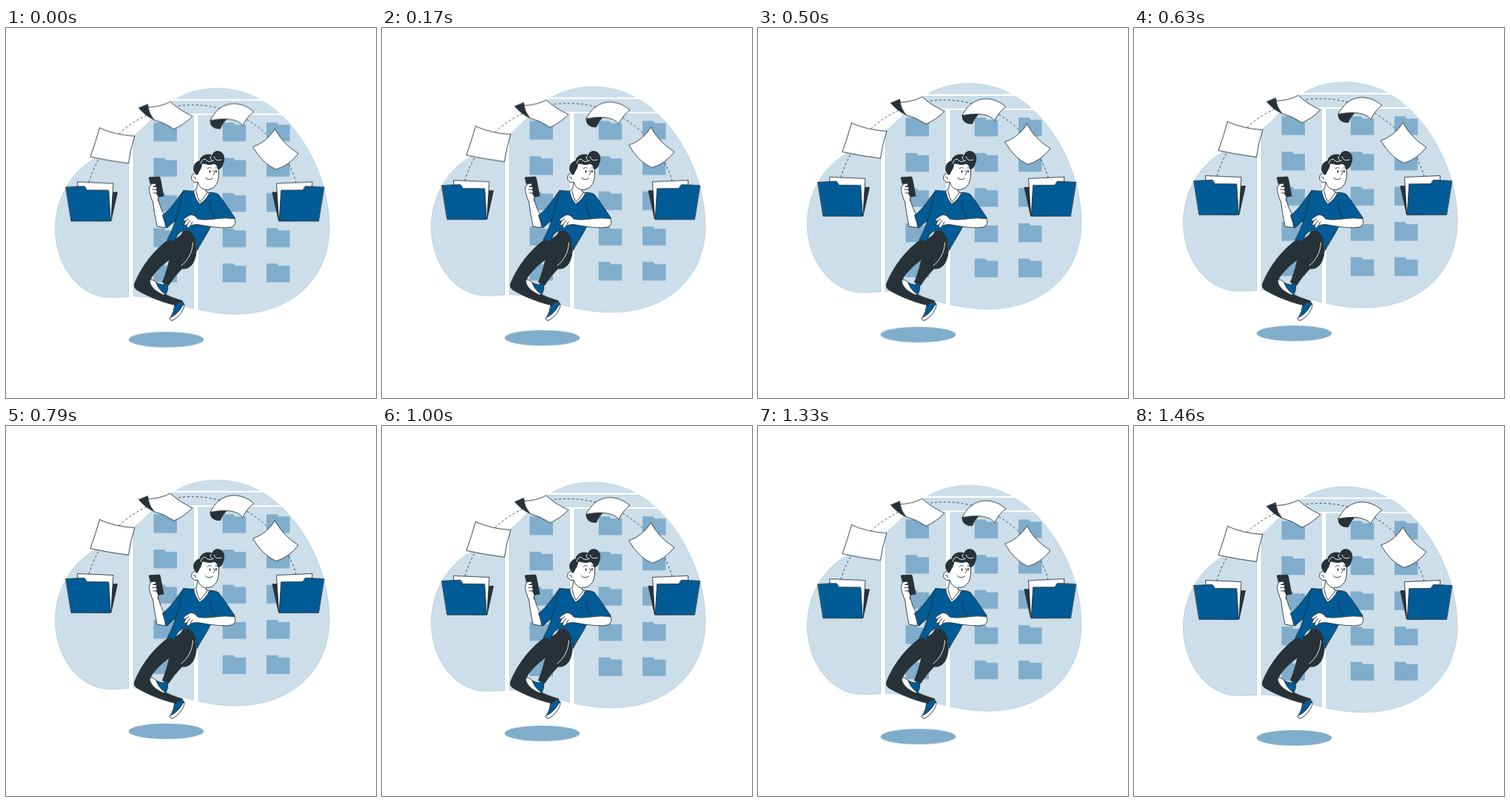
Write an HTML page without scripts that moves like this. It is 500x500 px and loops after 1.5 s.

```html
<!DOCTYPE html>
<html lang="en">
<head>
<meta charset="utf-8">
<title>File transfer</title>
<style>
  html, body { margin: 0; width: 100%; height: 100%; overflow: hidden; background: #fff; }
  svg { display: block; width: 100%; height: 100%; }
  .float { animation: float 1.5s linear -.035s infinite; }
  @keyframes float { 50% { transform: translateY(-10px); } }
  .line { stroke: #263238; stroke-width: .9; stroke-linejoin: round; stroke-linecap: round; }
  .none { fill: none; }
  .white { fill: #fff; }
  .blue { fill: #005b96; }
  .dark { fill: #263238; }
  .mid { fill: #80adcb; }
  .edge { stroke: #80adcb; }
  .gap { stroke: #fff; }
</style>
</head>
<body>
<svg viewBox="0 0 500 500">
  <defs>
    <path id="blob" d="M285 82C308 82 328 88 345 98C392 124 437 195 437 270C437 340 385 387 310 387C255 387 215 363 172 363C160 364 150 364.500 140 364.500C98 364 66.500 320 66.500 272C66.500 238 82 203 110 183C130 169 150 161 171 147C190 134 203 113 228 97C245 87 265 82 285 82Z"/>
    <clipPath id="inside"><use href="#blob"/></clipPath>
    <path id="icon" d="M0 0H14.500L16.500 3H31.500V25.300H0Z"/>
    <g id="column" class="mid">
      <use href="#icon"/>
      <use href="#icon" y="47.600"/>
      <use href="#icon" y="95.200"/>
      <use href="#icon" y="142.800"/>
      <use href="#icon" y="190.400"/>
    </g>
    <path id="uprights" d="M169 130V380M256.700 118V400"/>
    <path id="shelves" d="M205 97.800H360M180 117H390"/>
    <g id="folder" class="line">
      <path class="dark" d="M143 222.500H150.500L142 261H120Z"/>
      <path class="white" d="M97 208.500L145 210.500L142 259H100Z"/>
      <path class="blue" d="M81 215.500L106 214.300L109.500 219.500L138.800 219.800L141.300 261.300H88.300Z"/>
    </g>
  </defs>

  <g class="float">
    <use href="#blob" fill="#ccdeea" class="edge" stroke-width=".4"/>
    <g clip-path="url(#inside)" class="edge">
      <use href="#uprights" stroke-width="6.800"/>
      <use href="#shelves" stroke-width="3.400"/>
    </g>
    <g class="gap">
      <use href="#uprights" stroke-width="6.200"/>
      <use href="#shelves" stroke-width="2.900"/>
    </g>
    <use href="#column" x="199.500" y="128.300"/>
    <use href="#column" x="292.800" y="128.300"/>
    <use href="#column" x="352" y="128.300"/>
    <ellipse class="mid" cx="216.500" cy="421.500" rx="50.800" ry="10.600"/>

    <path class="line none" stroke-dasharray="3 3" style="stroke-linecap:butt" d="M112 209A146 146 0 0 1 392 209"/>
    <use href="#folder"/>
    <use href="#folder" transform="matrix(-1 0 0 1 510.500 0)"/>

    <g class="line">
      <path class="white" d="M126.500 135.500Q147 145 174 146.500Q168 164 165.500 183.300Q139 180 114 174.500Q121 155 126.500 135.500Z"/>
      <path class="dark" d="M179.500 108.500L191.500 103.500Q192 115 200 124.500Q187 118 179.500 108.500Z"/>
      <path class="white" d="M192 107.500Q209 107 222 100Q235 112 252 119.500Q241 131 227 137Q214 128 200 124.500Q193 116 192 107.500Z"/>
      <path class="dark" d="M276 125.500Q287 122 299 122.500Q292 129 289.500 136.500Q276 137 276 125.500Z"/>
      <path class="white" d="M276 125.500C287 101 313 95 335 113.500Q325 121 320 132.300Q309 119 276 125.500Z"/>
      <path class="white" d="M363.500 137Q374 157 395 170Q383 186 365 191.500Q347 184 333.500 161Q352 155 363.500 137Z"/>
    </g>
  </g>

  <g class="line">
    <!-- raised arm and phone -->
    <path class="white" d="M198 230Q200 250 204 268L215 270L216 256Q208 244 205.500 230Z"/>
    <path class="dark" d="M193.500 202L206.500 201Q208 201 208.300 202.500L213 227L200 229.500Z"/>
    <path class="white" d="M198 234C195 226 192 219 194.500 213Q196 210 201 210Q204 211 202 213.500L198.500 214.500L203 214.500Q205 216 203 218L204 220Q205 222 203 223L206 228L205 234"/>
    <path class="none" d="M198 218.500L203 218M199 223L203 223"/>

    <!-- legs -->
    <path class="dark" d="M240 276C254 278 262 297 254 315C250 324 243 326 238 325Q227 336 219.500 348Q215 347 211.500 343.500C217 330 220 318 222 307Z"/>
    <path class="white" d="M225 370L232 376L237 372L231 367Z"/>
    <path class="blue" d="M228 374Q234 374 238 369.500L241 373Q238 386 226 394.500L221.500 392.500Q227 384 228 374Z"/>
    <path class="white" d="M240.500 372.500Q242 376 238 383Q231 393 224 395.500Q221 395 221.500 391.500Q230 388 235 381Z"/>
    <path class="dark" d="M220 286Q234 287 240 274Q254 272 257 290Q251 289 245 295C227 309 203 323 194 342Q204 359 239 369L229 374.500C212 371 190 362 177 354Q172 351 174 345C181 327 197 302 220 286Z"/>
    <path class="none" style="stroke:#fff" d="M252.500 290C252 303 246 314 237 321"/>
    <path class="blue" d="M203 344Q211 349 218 345.500Q220 351 217 358.500Q215 362 211 359.500Q204 353 203 344Z"/>
    <path class="white" d="M194 340.500Q199 339 203 344Q206 354 215.500 360Q213 361.500 209 359Q194 351 194 340.500Z"/>

    <!-- shirt -->
    <path class="blue" d="M240 219.500L254 220.500Q265 226 275 222.500Q285 222 288 226Q297 238 309.500 257L280 260C275 274 266 286 258 301C257 284 252 274 242 273C233 275 229 283 228 289L218 286Q225 274 229 260L217 270.500L211.500 253C222 246 231 231 240 219.500Z"/>
    <path class="none" d="M239 222Q235 242 229 261M275 236Q277 247 282 257"/>

    <!-- head -->
    <path class="white" d="M253.500 220.500L257.500 218L259 208L271 217L270 221L275 223Q270 233 261.500 238Q255 230 253.500 220.500Z"/>
    <path class="none" d="M257 220Q258 229 262 235Q268 230 272 222.500"/>
    <path class="white" d="M262 183C260 189 260 194 259 198C251 193 247 205 255 208.500Q257 209 259 208C262 217 268 220 275 218C284 216 287 207 287.500 199L287.500 184Z"/>
    <path class="dark" d="M257.500 198C253 194 252 187 257 182Q260 179 262 180C262 173 271 169 279 172C280 166 288 165 292 169C296 173 295 180 293 184Q291 191 286.500 190.500Q286 185 281 183C274 187 268 182 265 183Q264 190 261 193.500Q260 197 257.500 198Z"/>
    <path class="none" style="stroke:#fff" d="M263 183Q265 177 269 177Q274 183 280 179M281 174Q283 181 291 178M277 173Q274 177 280 180"/>
    <path class="none" d="M253.500 201Q256 201 256.500 204.500M280 192Q284 196 280 198.500M269.500 202.500Q274 207 279.500 203M272 190Q274 187.500 277 189M283 189Q285 188 286 189.500"/>
    <g class="dark" style="stroke:none">
      <ellipse cx="275.500" cy="194" rx="1" ry="1.700"/>
      <ellipse cx="283.800" cy="193.500" rx="1" ry="1.700"/>
    </g>

    <!-- folded arm -->
    <path class="white" d="M281 258Q296 256 309 257.500Q312 266 305 269Q293 272 259 265.500L253 266Q249 266.500 246.500 270L244 269L245 265Q242 268 240.500 266L243 260L239.500 261.500Q239 259 243 256L249 252.500Q255 252 259 258Q268 260 281 258Z"/>
    <path class="none" d="M243 260L247 258M245 265L249 260M249 267L252 262"/>
  </g>
</svg>
</body>
</html>
```
